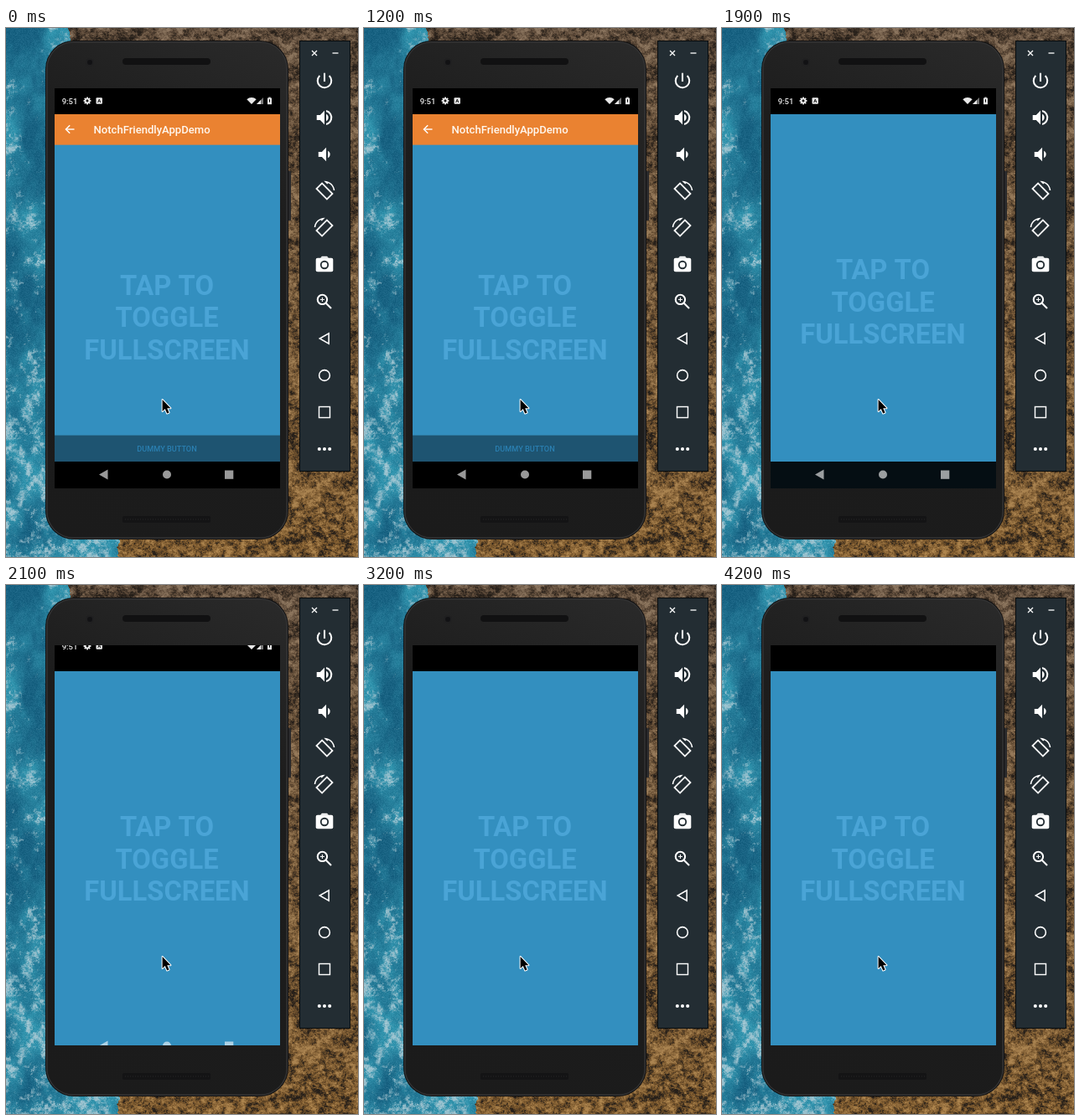
Write an HTML page with a canvas that moves like this. It is 420x632 px and loops after 4300 ms.

```html
<!DOCTYPE html>
<html lang="en">
<head>
<meta charset="utf-8">
<title>Fullscreen toggle</title>
<style>
  html, body { margin: 0; width: 100%; height: 100%; overflow: hidden; background: #000; }
  canvas { display: block; }
</style>
</head>
<body>
<canvas id="stage" width="420" height="632"></canvas>
<script>
const W = 420, H = 632, LOOP = 4300, TAU = Math.PI * 2;
const SCREEN = { x: 58, y: 72, w: 269, h: 478 };
const DP = SCREEN.w / 411;
const STATUS_BOTTOM = 103, NAV_TOP = 518, BAR_H = 56 * DP;
const stage = document.getElementById('stage').getContext('2d');
const backdrop = document.createElement('canvas');
backdrop.width = W;
backdrop.height = H;
let g = backdrop.getContext('2d');

const clamp = (v, lo = 0, hi = 1) => Math.min(hi, Math.max(lo, v));
const mix = (a, b, k) => a + (b - a) * k;
const mixColor = (a, b, k) => a.map((v, i) => mix(v, b[i], k));

function rect(x, y, w, h, color) {
  g.fillStyle = color;
  g.fillRect(x, y, w, h);
}
function roundRect(x, y, w, h, r, color) {
  g.beginPath();
  g.roundRect(x, y, w, h, r);
  g.fillStyle = color;
  g.fill();
}
function disc(x, y, r, color) {
  g.beginPath();
  g.arc(x, y, r, 0, TAU);
  g.fillStyle = color;
  g.fill();
}
function arc(x, y, r, from, to) {
  g.beginPath();
  g.arc(x, y, r, from, to);
  g.stroke();
}
function poly(points, filled = true) {
  g.beginPath();
  points.forEach(([x, y]) => g.lineTo(x, y));
  if (filled) {
    g.closePath();
    g.fill();
  } else g.stroke();
}
function text(str, x, y, font, color, align = 'left') {
  g.font = font + ' Roboto, sans-serif';
  g.fillStyle = color;
  g.textAlign = align;
  g.textBaseline = 'alphabetic';
  g.fillText(str, x, y);
}
function at(x, y, draw) {
  g.save();
  g.translate(x, y);
  draw();
  g.restore();
}

// Value noise and its fractal sum
function hash(x, y) {
  let n = Math.imul(x, 374761393) + Math.imul(y, 668265263);
  n = Math.imul(n ^ (n >>> 13), 1274126177);
  return ((n ^ (n >>> 16)) >>> 0) / 4294967296;
}
function noise(x, y) {
  const ix = Math.floor(x), iy = Math.floor(y);
  const s = v => v * v * (3 - 2 * v);
  const u = s(x - ix), v = s(y - iy);
  return mix(mix(hash(ix, iy), hash(ix + 1, iy), u),
             mix(hash(ix, iy + 1), hash(ix + 1, iy + 1), u), v);
}
function fractal(x, y, gain = 0.5) {
  let sum = 0, total = 0, amp = 1;
  for (let i = 0; i < 4; i++, amp *= gain, x *= 2.1, y *= 2.1) {
    sum += amp * noise(x, y);
    total += amp;
  }
  return sum / total;
}

function sea(x, y) {
  const low = y / H;
  const broad = fractal(x / 30 + 3, y / 45 + 7);
  const fine = fractal(x / 9, y / 9, 0.8);
  const water = mixColor([24, 98, 130], [48, 146, 172], clamp(broad * 2.4 - 0.75 + low * 0.3));
  const foam = clamp((fine - 0.56 + (broad - 0.5) * 0.5 + (low - 0.5) * 0.16) * 4);
  const grain = (hash(x, y) - 0.5) * 16;
  return mixColor(water, [182, 207, 216], foam * 0.8).map(v => v + grain);
}
function rock(x, y) {
  const low = y / H;
  const crag = fractal(x / 8 + y / 30, y / 7 - x / 30, 0.85);
  const patch = fractal(x / 40, y / 40 + 5);
  const n = clamp((crag - 0.5) * 2.2 + (patch - 0.5) * 0.5 + 0.5);
  const mid = mixColor([93, 74, 57], [122, 87, 44], low);
  const high = mixColor([138, 116, 94], [174, 133, 78], low);
  return n < 0.5 ? mixColor([38, 31, 25], mid, n * 2) : mixColor(mid, high, n * 2 - 1);
}
function drawWallpaper() {
  const image = g.createImageData(W, H);
  for (let y = 0; y < H; y++) {
    for (let x = 0; x < W; x++) {
      const shore = 75 + 61 * y / H + (fractal(x / 9, y / 9) - 0.5) * 14;
      const color = x < shore ? sea(x, y) : rock(x, y);
      image.data.set([...color, 255], (y * W + x) * 4);
    }
  }
  g.putImageData(image, 0, 0);
}

function drawPhone() {
  roundRect(336, 171, 4, 59, 1, '#29292b');
  roundRect(47, 15, 290, 596, 34, '#101011');
  roundRect(48, 16, 288, 594, 33, '#343435');
  const body = g.createLinearGradient(50, 600, 330, 20);
  body.addColorStop(0, '#1b1b1b');
  body.addColorStop(0.7, '#1d1d1d');
  body.addColorStop(1, '#2a2a2a');
  roundRect(49.5, 17.5, 285, 591, 31, body);
  roundRect(139, 36, 105, 8, 4, '#111112');
  roundRect(139, 583, 105, 8, 2, '#141415');
  for (let x = 142; x < 242; x += 3) rect(x, 586, 1, 2, '#1d1d1e');
  disc(100, 41, 5, '#202021');
  disc(100, 41, 3, '#121214');
}

// Toolbar icons sit on a 24-unit grid centred on the origin
function speaker(x) {
  poly([[x, -3], [x + 4, -3], [x + 9, -8], [x + 9, 8], [x + 4, 3], [x, 3]]);
}
function soundWave(x) {
  g.fill(new Path2D(`M${x + 2.5} 0c0-1.77-1.02-3.29-2.5-4.03v8.05c1.48-.73 2.5-2.25 2.5-4.02z`));
}
function rotateIcon(dir) {
  g.scale(dir, 1);
  g.lineWidth = 1.8;
  g.save();
  g.rotate(Math.PI / 4);
  g.strokeRect(-8.5, -4.5, 17, 9);
  g.restore();
  g.fill(new Path2D('M4.48-9.48c3.27 1.55 5.61 4.72 5.97 8.48h1.5C11.44-7.16 6.29-12 0-12l-.66.03 3.81 3.81z'));
}
const toolIcons = [
  () => {
    arc(0, 0, 8, -0.82, Math.PI + 0.82);
    rect(-1, -9, 2, 10, '#fff');
  },
  () => {
    speaker(-9);
    soundWave(2);
    arc(0, 0, 8, -1.32, 1.32);
  },
  () => {
    speaker(-7);
    soundWave(4);
  },
  () => rotateIcon(1),
  () => rotateIcon(-1),
  () => {
    roundRect(-10, -8, 20, 16, 2, '#fff');
    poly([[-4.83, -8], [-3, -10], [3, -10], [4.83, -8]]);
    disc(0, 0, 5, '#232d33');
    disc(0, 0, 3.2, '#fff');
  },
  () => {
    arc(-2.5, -2.5, 5.5, 0, TAU);
    poly([[1.5, 1.5], [7.8, 7.8]], false);
    rect(-5, -3, 5, 1, '#fff');
    rect(-3, -5, 1, 5, '#fff');
  },
  () => {
    g.lineWidth = 1.5;
    g.beginPath();
    g.moveTo(-5.5, 0);
    g.lineTo(5, -6);
    g.lineTo(5, 6);
    g.closePath();
    g.stroke();
  },
  () => {
    g.lineWidth = 1.5;
    arc(0, 0, 6.2, 0, TAU);
  },
  () => {
    g.lineWidth = 1.4;
    g.strokeRect(-6.3, -6.3, 12.6, 12.6);
  },
  () => [-6, 0, 6].forEach(x => disc(x, 0, 2, '#fff'))
];
function drawToolbar() {
  rect(350, 15, 61, 515, '#070b0d');
  rect(351, 16, 59, 513, '#232d33');
  g.strokeStyle = '#fff';
  g.lineWidth = 1.3;
  poly([[365, 27], [371, 33]], false);
  poly([[371, 27], [365, 33]], false);
  poly([[389.5, 30], [396.5, 30]], false);
  toolIcons.forEach((draw, i) => at(380, 63 + i * 44, () => {
    g.scale(1.03, 1.03);
    g.fillStyle = g.strokeStyle = '#fff';
    g.lineWidth = 2;
    draw();
  }));
}

function drawStatus(shift) {
  rect(SCREEN.x, SCREEN.y, SCREEN.w, STATUS_BOTTOM - SCREEN.y, '#000');
  const ink = '#e8e8e8';
  at(0, 87 - shift, () => {
    text('9:51', 66.7, 3.5, '500 9.5px', ink);
    for (let i = 0; i < 8; i++) at(97, 0, () => {
      g.rotate(i * TAU / 8);
      rect(-1, -4.4, 2, 2, ink);
    });
    disc(97, 0, 3.3, ink);
    disc(97, 0, 1.4, '#000');
    roundRect(107.5, -3.7, 7.4, 7.4, 1, ink);
    text('A', 111.2, 2.3, '700 6px', '#000', 'center');
    g.fillStyle = ink;
    g.beginPath();
    g.moveTo(293, 4);
    g.arc(293, 4, 8, -Math.PI * 0.75, -Math.PI * 0.25);
    g.fill();
    g.fillStyle = '#777';
    poly([[299, 4], [307, 4], [307, -4]]);
    g.fillStyle = ink;
    poly([[299, 4], [304, 4], [304, -1]]);
    rect(312, -3.4, 5, 7.6, ink);
    rect(313.3, -4.4, 2.4, 1.2, ink);
    rect(314, -1.8, 1, 3.4, '#000');
  });
}

function drawNav(shade, shift) {
  rect(SCREEN.x, NAV_TOP, SCREEN.w, 32, `rgba(0,0,0,${shade})`);
  const ink = 'rgba(255,255,255,.6)';
  at(0, 533.5 + shift, () => {
    g.fillStyle = ink;
    poly([[111, 0], [121.5, -6], [121.5, 6]]);
    disc(192, 0, 5, ink);
    rect(261, -5, 10.3, 10.3, ink);
  });
}

function drawAppBar(shift) {
  rect(SCREEN.x, STATUS_BOTTOM - shift, SCREEN.w, BAR_H, '#ea8231');
  at(0, 121 - shift, () => {
    g.strokeStyle = '#fff';
    g.lineWidth = 1.4;
    poly([[81.5, 0], [71.5, 0]], false);
    poly([[76.2, -4.8], [71.4, 0], [76.2, 4.8]], false);
    text('NotchFriendlyAppDemo', 104.5, 5, `500 ${20 * DP}px`, '#fff7ee');
  });
}

function drawScreen(t) {
  const hidden = clamp((t - 1435) / 250) ** 2;
  const barShift = BAR_H * hidden;
  const leave = (Math.max(0, t - 1900) / 200) ** 2;
  const center = SCREEN.x + SCREEN.w / 2;

  g.save();
  g.beginPath();
  g.rect(SCREEN.x, SCREEN.y, SCREEN.w, SCREEN.h);
  g.clip();
  rect(SCREEN.x, SCREEN.y, SCREEN.w, SCREEN.h, '#338fbf');
  ['TAP TO', 'TOGGLE', 'FULLSCREEN'].forEach((line, i) =>
    text(line, center - 0.5, 318.7 + i * 38.4 - barShift / 2, `700 ${50 * DP}px`, '#4aa4d6', 'center'));
  if (t < 1435) {
    rect(SCREEN.x, 486.6, SCREEN.w, 31.4, 'rgba(0,0,0,.41)');
    text('DUMMY BUTTON', center - 0.5, 506, `500 ${14 * DP}px`, '#2a7fb1', 'center');
  }
  if (hidden < 1) drawAppBar(barShift);
  drawStatus(14 * leave);
  drawNav(clamp((2080 - t) / 200), 17 * leave);
  g.restore();
}

function drawCursor() {
  g.fillStyle = '#000';
  g.strokeStyle = '#fff';
  g.lineWidth = 2;
  g.lineJoin = 'round';
  at(186.6, 444, () => {
    g.beginPath();
    [[0, 0], [0, 14], [3.2, 11], [5.6, 16.5], [8, 15.5], [5.6, 10.2], [9.8, 10.2]]
      .forEach(([x, y]) => g.lineTo(x, y));
    g.closePath();
    g.stroke();
    g.fill();
  });
  g.lineJoin = 'miter';
}

drawWallpaper();
drawPhone();
drawToolbar();
g = stage;

const start = performance.now();
function frame() {
  const elapsed = (performance.now() - start) % LOOP;
  const t = Math.floor(elapsed / 100) * 100;
  g.drawImage(backdrop, 0, 0);
  drawScreen(t);
  drawCursor();
  requestAnimationFrame(frame);
}
frame();
</script>
</body>
</html>
```
